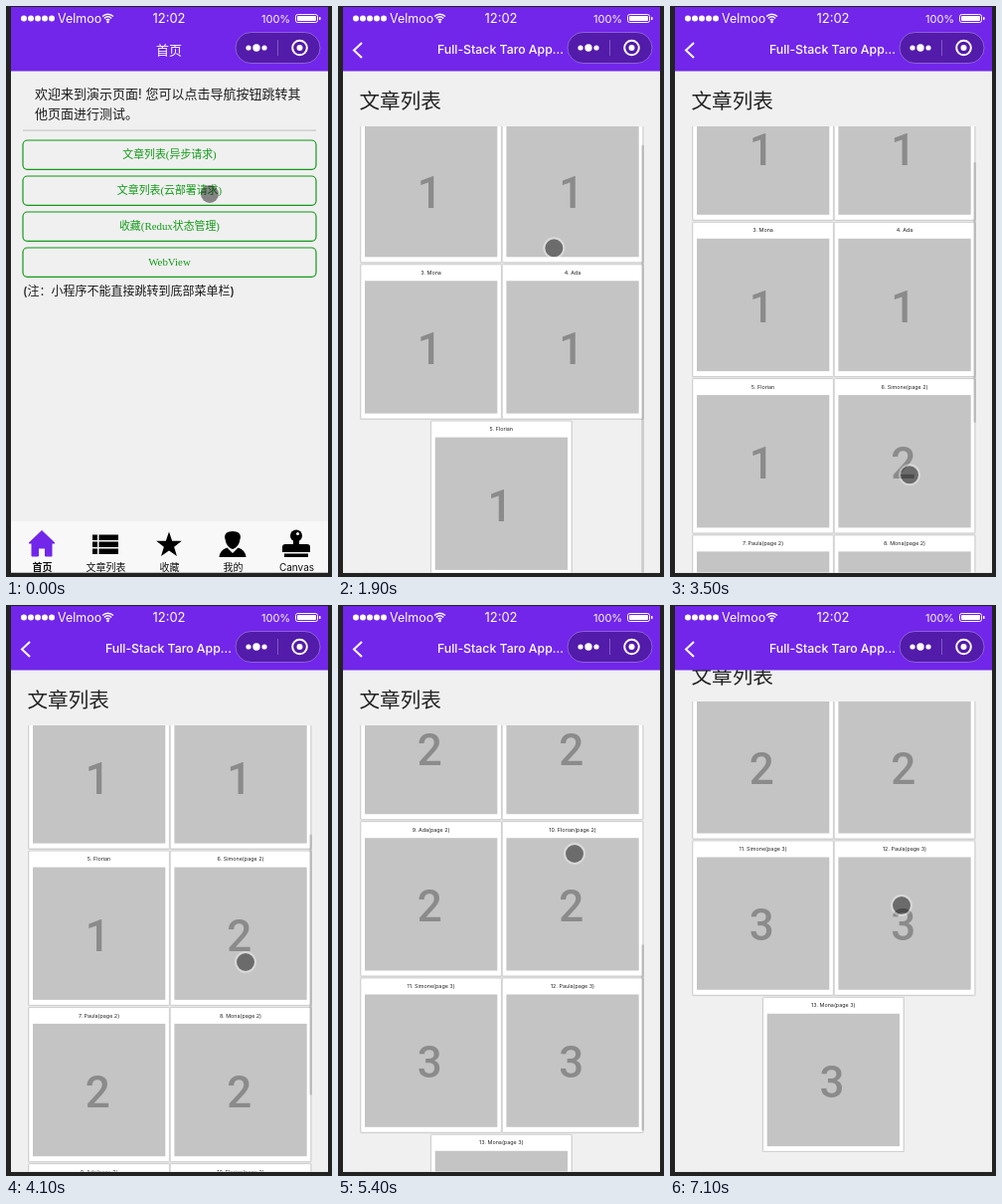
An HTML page for the animation above (7200 ms loop, 328 by 574 pixels).

```html
<!DOCTYPE html>
<html lang="zh">
<head>
<meta charset="utf-8">
<title>Mini program demo</title>
<style>
html, body { margin: 0; width: 100%; height: 100%; overflow: hidden; background: #222; }
svg { display: block; width: 328px; height: 574px; }
text { font-family: Inter, "Noto Sans CJK SC", "Noto Sans CJK", sans-serif; }
.serif { font-family: "Liberation Serif", "Noto Sans CJK SC", "Noto Sans CJK", serif; }
.arial { font-family: "Liberation Sans", sans-serif; }
.digit { font-family: Roboto, sans-serif; }
.medium { font-weight: 500; }
</style>
</head>
<body>
<svg id="stage" viewBox="0 0 328 574"></svg>
<script>
const LOOP = 7200, STEP = 100;
const PURPLE = '#7126ea', GREEN = '#119a17', PAGE = '#f0f0f0';
const PITCH = 157.3, TALL = 106.7, VIEW = 454, TOP = 121.5;
const NAMES = ['Simone', 'Paula', 'Mona', 'Ada', 'Florian'];

// [time, value...]
const SCROLL = [[1700, 0], [1900, 19], [3300, 19], [4100, 189], [4400, 330],
  [5000, 330], [5400, 533], [5600, 647]];
const PAGE_Y = [[5600, 0], [5800, 28], [6200, 28], [6400, 24]];
const CURSOR = [[200, 205, 189], [1100, 297, 234], [1500, 236, 330], [1700, 228, 300],
  [2000, 212, 215], [2600, 209, 202], [3200, 238, 480], [3400, 241, 490],
  [4100, 241, 359], [4400, 238, 218], [4900, 240, 430], [5000, 240, 440],
  [5400, 238, 250], [5600, 238, 150], [5700, 239, 330], [5900, 241, 298],
  [6100, 241, 295], [6400, 240, 297], [6500, 240, 297], [7100, 233, 302]];
const TOAST = [[600, 1000], [2300, 3100], [4400, 4800], [5900, 6400]];
const LIST_BAR = [[1700, 3100], [3300, 4800], [4900, 6000]];

const rect = (x, y, w, h, fill, more = '') =>
  `<rect x="${x}" y="${y}" width="${w}" height="${h}" fill="${fill}" ${more}/>`;
const circle = (x, y, r, fill, more = '') =>
  `<circle cx="${x}" cy="${y}" r="${r}" fill="${fill}" ${more}/>`;
const path = (d, fill, more = '') => `<path d="${d}" fill="${fill}" ${more}/>`;
// y is the vertical middle of the glyphs
const label = (s, x, y, size, fill, more = '') =>
  `<text x="${x}" y="${y + size * 0.36}" font-size="${size}" fill="${fill}" ${more}>${s}</text>`;
const mid = 'text-anchor="middle"', medium = 'class="medium"';
const header = () => rect(5, 1, 319, 64.5, PURPLE);

function statusBar() {
  let s = '';
  for (let i = 0; i < 5; i++) s += circle(18 + i * 7, 12.5, 3, '#fff');
  s += label('Velmoo', 52, 12.5, 12.5, '#fff');
  for (const r of [2.5, 5, 7.5]) {
    const k = r * 0.72;
    s += path(`M${102.5 - k} ${16 - k}A${r} ${r} 0 0 1 ${102.5 + k} ${16 - k}`, 'none',
      'stroke="#fff" stroke-width="1.5"');
  }
  s += circle(102.5, 16, 1.2, '#fff');
  s += label('12:02', 164, 12.5, 13, '#fff', mid);
  s += label('100%', 257, 13.5, 11, '#fff');
  s += rect(291.5, 8.5, 22, 8, 'none', 'rx="2" stroke="#fff"');
  s += rect(293, 10, 19, 5, '#fff', 'rx="1"') + rect(315, 11, 1.5, 3, '#fff');
  return s;
}

function capsule() {
  return rect(231, 26.5, 85, 31, 'rgba(0,0,0,.28)', 'rx="15.5" stroke="rgba(255,255,255,.28)"') +
    circle(244, 42, 2.6, '#fff') + circle(252, 42, 3.7, '#fff') + circle(260, 42, 2.6, '#fff') +
    rect(273, 34, 1, 16, 'rgba(255,255,255,.28)') +
    circle(295.5, 42, 7.3, 'none', 'stroke="#fff" stroke-width="2"') + circle(295.5, 42, 3, '#fff');
}

function star(x, y, r) {
  let d = '';
  for (let i = 0; i < 10; i++) {
    const a = i * Math.PI / 5, q = i % 2 ? r * 0.4 : r;
    d += `${i ? 'L' : 'M'}${x + q * Math.sin(a)} ${y - q * Math.cos(a)}`;
  }
  return path(d + 'Z', '#000');
}

function tabBar() {
  let s = rect(5, 518, 319, 52, '#f8f8f8');
  s += path('M36 527.5L49 540H46V553H39.5V545H32.5V553H26V540H23Z', PURPLE,
    `stroke="${PURPLE}" stroke-linejoin="round"`);
  for (let i = 0; i < 3; i++) {
    s += rect(87, 531.5 + i * 7, 5, 5.5, '#000') + rect(93.5, 531.5 + i * 7, 19.5, 5.5, '#000');
  }
  s += star(164, 542, 13.5);
  s += path('M220 534Q220 528 228 528T236 534L234.5 540Q232 545 228 546Q224 545 221.5 540Z' +
    'M214.5 554Q215 547 222.5 544.5L228 550L233.5 544.5Q241 547 241.5 554Z', '#000');
  s += circle(292, 532.5, 6, '#000') +
    path('M289 535H295V541H303Q306 541 306 544V549H278V544Q278 541 281 541H289Z', '#000') +
    rect(280, 550.5, 24, 3.5, '#000') + circle(293.5, 530.5, 1.5, '#fff');
  ['首页', '文章列表', '收藏', '我的', 'Canvas'].forEach((name, i) => {
    s += label(name, 36.5 + i * 64, 564, 10, '#111', mid + (i ? '' : ' font-weight="700"'));
  });
  return s;
}

function homePage() {
  let s = rect(5, 1, 319, 569, PAGE) + header();
  s += label('首页', 164, 44, 13, '#fff', `${mid} ${medium}`);
  s += label('欢迎来到演示页面! 您可以点击导航按钮跳转其', 29, 88, 13, '#1c1c1c');
  s += label('他页面进行测试。', 29, 108, 13, '#1c1c1c');
  s += rect(17, 124.5, 295, 1.2, '#c8c8c8');
  ['文章列表(异步请求)', '文章列表(云部署请求)', '收藏(Redux状态管理)', 'WebView'].forEach((name, i) => {
    const y = 135 + i * 36;
    s += rect(17, y, 295, 29.3, 'none', `rx="4.5" stroke="${GREEN}" stroke-width="1.2"`);
    s += label(name, 164.5, y + 14.5, 10.9, GREEN, mid + ' class="serif"');
  });
  s += label('(注：小程序不能直接跳转到底部菜单栏)', 17, 287, 12, '#1c1c1c', medium);
  return s + tabBar();
}

function cards(count, tall) {
  const grow = tall ? TALL : 0, img = 133.3 + grow;
  let s = '';
  for (let i = 0; i < count; i++) {
    const alone = i === count - 1 && count % 2;
    const x = alone ? 93.5 : 22.8 + 142.4 * (i % 2);
    const y = TOP + (i >> 1) * (PITCH + grow);
    const page = Math.floor(i / 5) + 1, suffix = page > 1 ? `(page ${page})` : '';
    s += rect(x - .7, y - .4, 143, 156.6 + grow, '#dcdcdc', 'rx="1"');
    s += rect(x, y, 141.6, 155.3 + grow, '#fff', 'rx="1" stroke="#c6c6c6" stroke-width=".8"');
    s += label(`${i + 1}. ${NAMES[i % 5]}${suffix}`, x + 70.8, y + 8.2, 5.4, '#222', mid);
    s += rect(x + 4.2, y + 16.5, 133.3, img, '#c4c4c4');
    s += `<g transform="translate(${x + 69.5} ${y + 16.5 + img / 2}) scale(1 ${img / 133.3})">` +
      label(page, 0, 1.5, 44, '#8b8b8b', mid + ' class="digit medium"') + '</g>';
  }
  return s;
}

function listPage() {
  return rect(5, 1, 319, 569, '#fff') +
    `<g id="body">${rect(5, 1, 319, 593, PAGE)}${label('文章列表', 21.5, 96, 20.6, '#222', medium)}
      <g clip-path="url(#view)"><g id="list"></g>
      ${rect(305.3, TOP, 2.6, 10, 'rgba(0,0,0,.16)', 'id="bar" rx="1.3"')}</g></g>` +
    rect(318, 93, 2.6, 465, 'rgba(0,0,0,.2)', 'id="pageBar" rx="1.3"') +
    header() +
    path('M24 37L16 44.5L24 52', 'none', 'stroke="#fff" stroke-width="2"') +
    label('Full-Stack Taro App...', 100, 44, 12.3, '#fff', medium);
}

function toast() {
  let s = rect(105, 178, 119.5, 119.5, '#414141', 'rx="4"') + '<g id="spin">';
  for (let i = 0; i < 12; i++) {
    s += rect(-1.3, -15.5, 2.6, 7.5, '#fff', `rx="1.3" opacity="${0.35 + i * 0.055}" transform="rotate(${i * 30})"`);
  }
  return s + '</g>' + label('加载中', 164.5, 265, 14.2, '#e8e8e8', mid);
}

const $ = id => document.getElementById(id);
$('stage').innerHTML = `
  <defs>
    <clipPath id="screen">${rect(5, 1, 319, 568.5, '#000')}</clipPath>
    <clipPath id="view">${rect(5, 121, 319, VIEW - 1, '#000')}</clipPath>
  </defs>
  ${rect(0, 0, 328, 574, '#222')}
  <g clip-path="url(#screen)">
    <g id="home">${homePage()}</g>
    <g id="article">${listPage()}</g>
    ${statusBar()}${capsule()}
    <g id="size">${rect(219, 67, 105, 23, '#f8f8f8')}
      ${label('320px × 504px', 224, 78.5, 14.1, '#222', 'class="arial"')}</g>
    <g id="toast">${toast()}</g>
    <g id="cursor">${circle(0, 0, 9, 'rgba(0,0,0,.45)')}
      ${circle(0, 0, 10, 'none', 'id="ring" stroke="rgba(255,255,255,.35)" stroke-width="2"')}</g>
  </g>`;

function at(track, t) {
  if (t <= track[0][0]) return track[0].slice(1);
  for (let i = 1; i < track.length; i++) {
    const a = track[i - 1], b = track[i];
    if (t <= b[0]) {
      const k = (t - a[0]) / (b[0] - a[0]);
      return a.slice(1).map((v, j) => v + (b[j + 1] - v) * k);
    }
  }
  return track[track.length - 1].slice(1);
}
const spanAt = (spans, t) => spans.find(([a, b]) => t >= a && t < b);
const show = (id, on) => $(id).setAttribute('visibility', on ? 'visible' : 'hidden');
const move = (id, x, y, more = '') => $(id).setAttribute('transform', `translate(${x} ${y}) ${more}`);

let shown = '';
function render(t) {
  const count = t < 1000 ? 0 : t < 3100 ? 5 : t < 4800 ? 10 : 13;
  const tall = t < 1200, key = count + '|' + tall;
  if (key !== shown) {
    $('list').innerHTML = cards(count, tall);
    shown = key;
  }
  const slide = Math.min(1, Math.max(0, (t - 200) / 300));
  move('article', 319 * (1 - slide) ** 2, 0);
  show('article', slide > 0);

  const [scroll] = at(SCROLL, t), [pageY] = at(PAGE_Y, t);
  move('list', 0, -scroll);
  move('body', 0, -pageY);
  const ratio = VIEW / (Math.ceil(count / 2) * PITCH || VIEW);
  $('bar').setAttribute('y', TOP + scroll * ratio);
  $('bar').setAttribute('height', VIEW * ratio);
  show('bar', spanAt(LIST_BAR, t));
  show('pageBar', t >= 5700 && t < 6400);
  show('size', t >= 500 && t < 1700);

  const loading = spanAt(TOAST, t);
  show('toast', loading);
  if (loading) {
    const turn = Math.floor((t - loading[0]) * 12 / 1000) * 30 + 240;
    move('spin', 164.5, 226.5, `rotate(${turn})`);
  }
  move('cursor', ...at(CURSOR, t));
  show('ring', t >= 200);
}

const start = performance.now();
function tick() {
  const t = (performance.now() - start) % LOOP;
  render(Math.floor(t / STEP) * STEP);
  requestAnimationFrame(tick);
}
tick();
</script>
</body>
</html>
```
